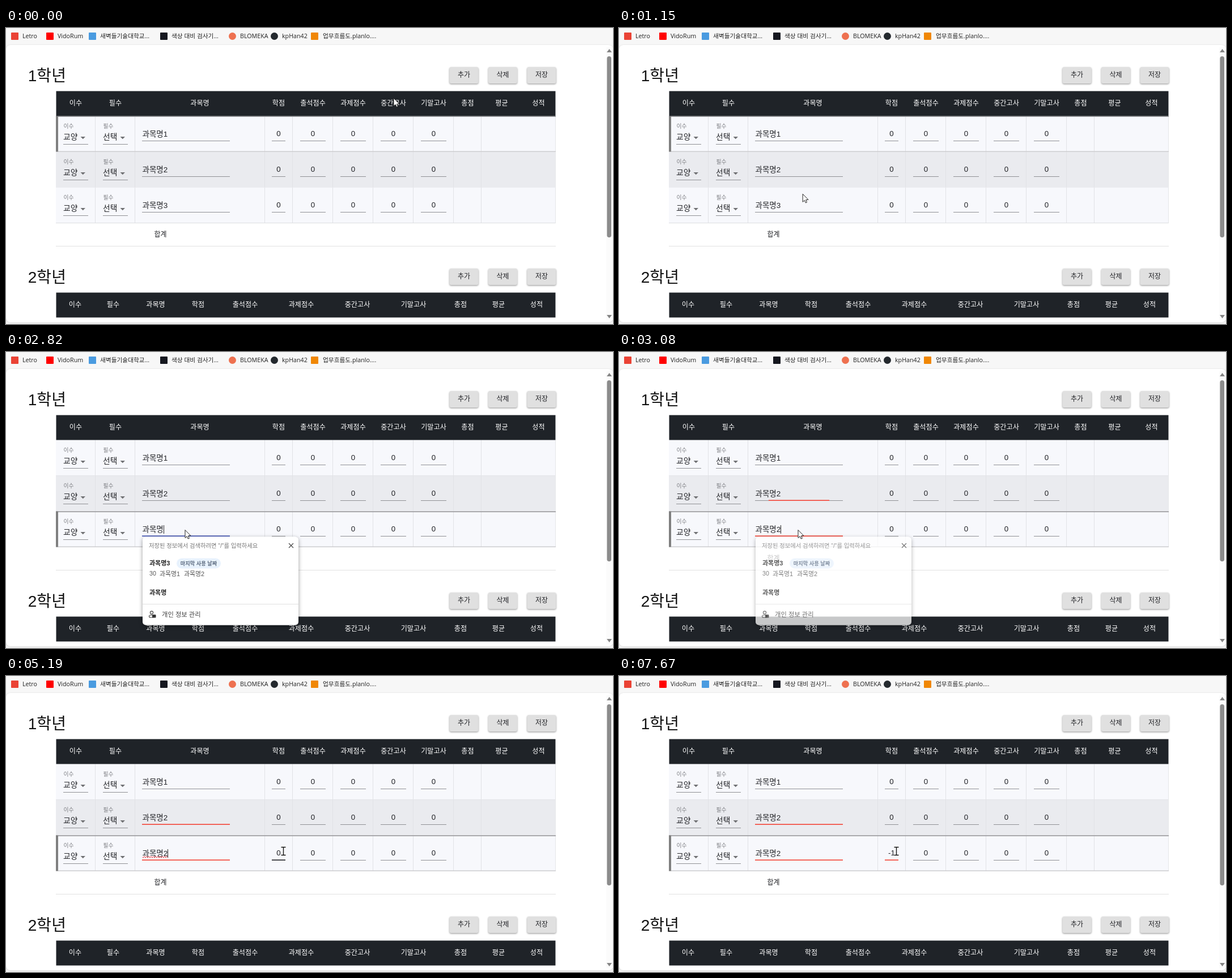
An HTML page with a canvas for the animation above (8 s loop, 1071 by 523 pixels).

```html
<!DOCTYPE html>
<html lang="ko">
<head>
<meta charset="utf-8">
<title>성적 입력</title>
<style>
html, body { margin: 0; width: 100%; height: 100%; overflow: hidden; background: #f7f7f7; }
canvas { display: block; }
</style>
</head>
<body>
<canvas id="stage" width="1071" height="523"></canvas>
<script>
const ctx = document.getElementById('stage').getContext('2d');
const LOOP = 8000;
const UI = '"Liberation Sans", "Noto Sans CJK KR", "Noto Sans CJK", sans-serif';
const BAR = '"Open Sans", "Noto Sans CJK KR", "Noto Sans CJK", sans-serif';
const INK = '#222327', BLUE = '#3f51b5', RED = '#f44336', DARK = '#1f2328';
const ROWS = [0, 63, 126];
const LINE_END = 200;
const NAME = [240, 155];
const NUMBERS = [[469, 24], [519, 45], [590, 45], [661, 45], [732, 45]];

function box(x, y, w, h, color) {
  ctx.fillStyle = color;
  ctx.fillRect(x, y, w, h);
}

function roundBox(x, y, w, h, r, color) {
  ctx.fillStyle = color;
  ctx.beginPath();
  ctx.roundRect(x, y, w, h, r);
  ctx.fill();
}

function shape(points, color) {
  ctx.fillStyle = color;
  ctx.beginPath();
  points.forEach(([x, y]) => ctx.lineTo(x, y));
  ctx.closePath();
  ctx.fill();
}

function shadow(color, blur, dy) {
  ctx.shadowColor = color;
  ctx.shadowBlur = blur;
  ctx.shadowOffsetY = dy;
}

// Text is placed by its vertical middle.
function text(str, x, cy, size, color = INK, align = 'left', weight = 400, family = UI) {
  ctx.font = `${weight} ${size}px ${family}`;
  ctx.textAlign = align;
  ctx.fillStyle = color;
  ctx.fillText(str, x, cy + size * 0.37);
}

const between = (t, a, b) => t >= a && t < b;

// Width of a focus line growing from its middle, 0 to 1.
function grow(t, start) {
  const p = Math.floor((t - start) / 60) * 60 / 200;
  return p <= 0 ? 0 : 1 - (1 - Math.min(p, 1)) ** 3.3;
}

function underline([x, w], dy, color, scale = 1, weight = 1.6) {
  box(x + w * (1 - scale) / 2, LINE_END + dy - weight, w * scale, weight, color);
}

// Pointer

const easeInOut = p => p * p * (3 - 2 * p);
const easeOut = p => 1 - (1 - p) ** 2;
const MOVES = [
  { at: 230, gap: 65, steps: 13, ease: easeInOut, path: [[685, 124], [333, 273]] },
  { at: 1080, gap: 68, steps: 7, ease: easeOut, path: [[333, 273], [317, 314.5]] },
  { at: 4490, gap: 70, steps: 11, ease: easeInOut, path: [[317, 314.5], [512, 299], [489.5, 309.5]] }
];

function along(path, p) {
  const s = p * (path.length - 1);
  const i = Math.min(Math.floor(s), path.length - 2);
  const [a, b] = [path[i], path[i + 1]];
  return [0, 1].map(k => a[k] + (b[k] - a[k]) * (s - i));
}

function pointer(t) {
  let pos = MOVES[0].path[0];
  for (const m of MOVES) {
    if (t < m.at) break;
    const done = Math.min(Math.floor((t - m.at) / m.gap) + 1, m.steps);
    pos = along(m.path, m.ease(done / m.steps));
  }
  return pos;
}

function fieldUnder([x, y]) {
  const row = ROWS.findIndex(d => between(y, 173 + d, 200 + d));
  const col = [NAME, ...NUMBERS].findIndex(([fx, w]) => between(x, fx, fx + w));
  return row >= 0 && col >= 0 ? { row, col } : null;
}

function drawPointer([x, y], beam) {
  ctx.save();
  if (beam) {
    ctx.translate(x, y);
    for (const [color, width] of [['rgba(255,255,255,.7)', 3], ['#111', 1.4]]) {
      ctx.strokeStyle = color;
      ctx.lineWidth = width;
      ctx.beginPath();
      ctx.moveTo(-4, -7); ctx.lineTo(4, -7);
      ctx.moveTo(0, -7); ctx.lineTo(0, 7);
      ctx.moveTo(-4, 7); ctx.lineTo(4, 7);
      ctx.stroke();
    }
  } else {
    ctx.translate(x - 1, y);
    shape([[0, 0], [0, 14], [3.2, 11.2], [5.2, 15.6], [7.4, 14.6], [5.5, 10.4], [9.8, 10]], '#fff');
    ctx.strokeStyle = '#222';
    ctx.lineWidth = 1;
    ctx.stroke();
  }
  ctx.restore();
}

// Page

function bookmarks() {
  const items = [
    ['Letro', 9, 29, '#ea4335', 0], ['VidoRum', 71, 91, '#ff0000', 0],
    ['새벽들기술대학교...', 146, 166, '#4a9be0', 0], ['색상 대비 검사기...', 272, 292, '#15171f', 0],
    ['BLOMEKA', 393, 413, '#ee7150', 1], ['kpHan42', 467, 487, '#24292e', 1],
    ['업무흐름도.planlo....', 538, 559, '#f08705', 0]
  ];
  for (const [label, ix, tx, color, round] of items) {
    roundBox(ix, 8, 13, 13, round ? 6.5 : 1, color);
    text(label, tx, 14, 10.7, '#222', 'left', 400, BAR);
  }
}

function scrollbar() {
  box(1059, 34, 12, 482, '#fbfbfb');
  roundBox(1060.4, 50, 7.6, 320, 3.8, '#8b8b8b');
  shape([[1060, 43], [1064.5, 37], [1069, 43]], '#858585');
  shape([[1060, 507], [1064.5, 513], [1069, 507]], '#858585');
}

function section(title, top, centers) {
  text(title, 38.8, top + 53.8, 28, '#111');
  [['추가', 782.5], ['삭제', 851], ['저장', 919.5]].forEach(([label, x]) => {
    ctx.save();
    shadow('rgba(0,0,0,.4)', 3, 1.2);
    roundBox(x, top + 39, 51, 29, 3, '#e0e0e0');
    ctx.restore();
    text(label, x + 25.5, top + 52.7, 12, INK, 'center');
  });
  box(88.5, top + 81.5, 881, 44, DARK);
  const heads = ['이수', '필수', '과목명', '학점', '출석점수', '과제점수', '중간고사', '기말고사', '총점', '평균', '성적'];
  heads.forEach((h, i) => text(h, centers[i], top + 102.5, 12.1, '#fff', 'center'));
}

function select(label, value, x, dy) {
  text(label, x + 0.5, 173.5 + dy, 9.8, '#7b7c80');
  text(value, x, 192 + dy, 13.8);
  shape([[x + 30.5, 192 + dy], [x + 39, 192 + dy], [x + 34.75, 196.2 + dy]], '#707174');
  box(x, 205 + dy, 44, 1, '#909195');
}

function state(t) {
  return {
    selected: t < 1630 ? 0 : 2,
    name: t < 2690 ? '과목명3' : t < 3020 ? '과목명' : '과목명2',
    credit: t < 6670 ? '0' : t < 6920 ? '' : t < 7140 ? '-' : '-1'
  };
}

function rowFrame(dy, i, selected) {
  const y = 155.5 + dy;
  box(88, y, 882, 63, i === 1 ? '#eaebef' : '#f7f8fc');
  for (const x of [157, 227, 456, 505, 576, 647, 718, 789, 838]) box(x, y, 1, 63, '#e1e2e6');
  box(88, 218 + dy, 882, 1, '#dddee1');
  box(969, y, 1, 63, '#e6e7ea');
  if (selected) {
    box(88, y, 882, 1.5, '#929295');
    box(88, 217.5 + dy, 882, 1.5, '#cdcdd0');
    box(88, y, 4, 63, '#808080');
  }
}

function table(s, hover) {
  ROWS.forEach((dy, i) => rowFrame(dy, i, false));
  rowFrame(ROWS[s.selected], s.selected, true);
  ROWS.forEach((dy, i) => {
    select('이수', '교양', 101, dy);
    select('필수', '선택', 171, dy);
    text(i === 2 ? s.name : '과목명' + (i + 1), 240.5, 187 + dy, 13.5);
    for (const field of [NAME, ...NUMBERS]) underline(field, dy, '#909195', 1, 1);
    NUMBERS.forEach(([x, w], n) => {
      text(i === 2 && n === 0 ? s.credit : '0', x + w / 2, 186.3 + dy, 13.3, INK, 'center');
    });
  });
  if (hover) underline([NAME, ...NUMBERS][hover.col], ROWS[hover.row], '#202125');
  text('합계', 272.5, 364.7, 12, INK, 'center');
  box(88, 385, 882, 1, '#e0e0e0');
}

function focusLines(t) {
  if (t >= 1630) underline(NAME, ROWS[2], t < 3020 ? BLUE : RED, grow(t, 1630));
  if (t >= 3020) underline(NAME, ROWS[1], RED, grow(t, 3020));
  if (t >= 5920) underline(NUMBERS[0], ROWS[2], t < 6920 ? BLUE : RED, grow(t, 5920));
}

function squiggle() {
  ctx.strokeStyle = '#e5383b';
  ctx.lineWidth = 1;
  ctx.beginPath();
  for (let x = 241; x <= 286; x++) ctx.lineTo(x, 319.8 + Math.sin((x - 241) * Math.PI / 2) * 1.3);
  ctx.stroke();
}

// Visible spans of the caret: from, to, x.
const CARET = [
  [1630, 2160, 285], [2690, 3020, 278], [3020, 3550, 285], [4340, 4660, 285],
  [5190, 5720, 285], [5920, 6470, 485], [6920, 7140, 484], [7140, 7670, 487]
];

function caret(t) {
  const span = CARET.find(([a, b]) => between(t, a, b));
  if (span) box(span[2], span[2] > 400 ? 305 : 306, 1, 15, '#222');
}

const POPUP_FADE = [[3290, 0], [3220, 0.2], [3150, 0.48], [3080, 0.75], [3020, 0.95], [2820, 1], [2690, 0.5], [0, 0]];

// The shadow is kept outside the panel so that it does not darken it while fading.
function popupPanel() {
  const frame = [241, 326.5, 275, 156, 6];
  ctx.save();
  ctx.beginPath();
  ctx.rect(0, 0, 1071, 523);
  ctx.roundRect(...frame);
  ctx.clip('evenodd');
  shadow('rgba(0,0,0,.4)', 7, 2);
  roundBox(...frame, '#fff');
  ctx.restore();
  roundBox(...frame, '#fff');
}

function popup(t) {
  const alpha = POPUP_FADE.find(([at]) => t >= at)[1];
  if (!alpha) return;
  ctx.save();
  ctx.globalAlpha = alpha;
  popupPanel();
  text('저장된 정보에서 검색하려면 "/"를 입력하세요', 252, 342, 10.3, '#777');
  ctx.strokeStyle = '#444';
  ctx.lineWidth = 1.1;
  ctx.beginPath();
  ctx.moveTo(499, 338); ctx.lineTo(507, 346);
  ctx.moveTo(507, 338); ctx.lineTo(499, 346);
  ctx.stroke();
  text('과목명3', 253, 372.5, 11, '#222', 'left', 700);
  roundBox(301, 364.5, 78, 18, 9, '#e8f2fd');
  text('마지막 사용 날짜', 340, 373.5, 9.2, '#5d6c80', 'center', 700);
  text('30', 253, 391.5, 10.7, '#555');
  text('과목명1', 271, 391.5, 10.9, '#555');
  text('과목명2', 314, 391.5, 10.9, '#555');
  text('과목명', 253, 424.5, 11, '#222', 'left', 700);
  box(241, 445, 275, 1, '#e0e0e0');
  ctx.beginPath();
  ctx.arc(257, 460.5, 2.6, 0, Math.PI * 2);
  ctx.stroke();
  ctx.beginPath();
  ctx.roundRect(252.5, 465, 8, 4, 2);
  ctx.stroke();
  roundBox(258, 464, 6.5, 5.5, 1, '#333');
  text('개인 정보 관리', 275, 463.5, 11.3, '#444');
  ctx.restore();
}

function draw(t) {
  const s = state(t);
  const pos = pointer(t);
  const field = fieldUnder(pos);
  const overPopup = between(t, 2690, 3290);
  const focused = field && field.row === 2 &&
    (field.col === 0 ? t >= 1630 : field.col === 1 && t >= 5920);

  box(0, 0, 1071, 523, '#f7f7f7');
  ctx.save();
  shadow('rgba(0,0,0,.16)', 3, 0.5);
  roundBox(0, 30, 1071, 490, 8, '#fff');
  ctx.restore();
  bookmarks();
  scrollbar();
  table(s, focused ? null : field);
  section('1학년', 30, [123, 193, 342, 481, 541.5, 612.5, 683.5, 754.5, 814.5, 874.5, 939.5]);
  section('2학년', 386, [122, 189, 264, 339, 422, 521, 620, 719, 802, 869, 936]);
  focusLines(t);
  if (between(t, 4340, 5920)) squiggle();
  caret(t);
  popup(t);
  drawPointer(pos, field && !overPopup);
}

const start = performance.now();
function tick() {
  draw((performance.now() - start) % LOOP);
  requestAnimationFrame(tick);
}
tick();
</script>
</body>
</html>
```
